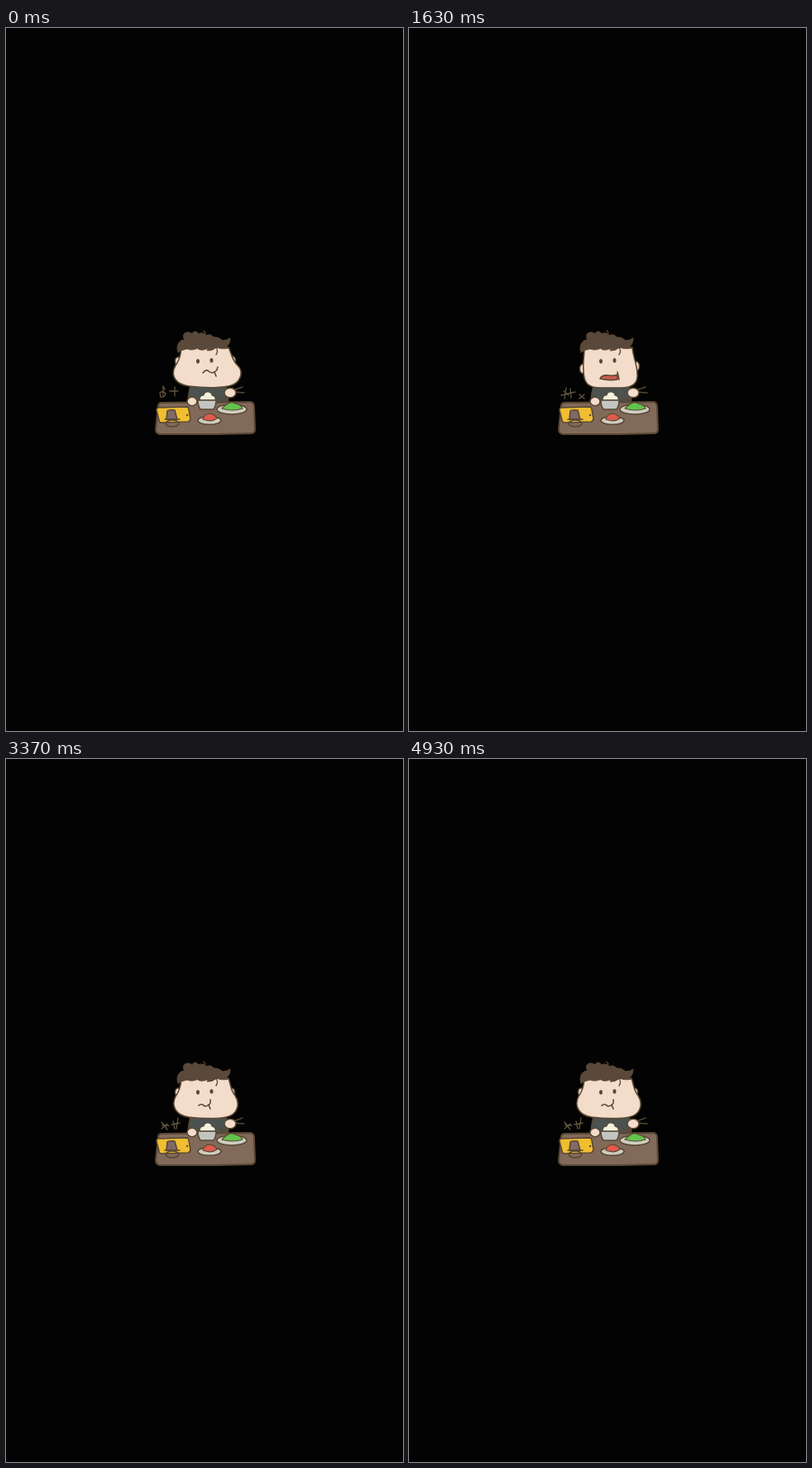
An HTML page that plays this animation: 480x848 px, repeating every 4960 ms.

```html
<!DOCTYPE html>
<html lang="en">
<head>
<meta charset="utf-8">
<title>Dinner</title>
<style>
html, body { margin: 0; width: 100%; height: 100%; overflow: hidden; background: #030303; }
svg { display: block; width: 100%; height: 100%; }
.ink { fill: none; stroke: #594833; stroke-width: 1.6; stroke-linecap: round; stroke-linejoin: round; }
.skin { fill: #f4dccb; }
.dot { fill: #594833; stroke: none; }
.spark { stroke: #62563f; stroke-width: 1.3; }
</style>
</head>
<body>
<svg viewBox="0 0 480 848">
<g class="ink">
  <!-- body -->
  <path fill="#4b5250" d="M223 432 Q220 442 220 455 H268 Q270 442 266 432Z"/>

  <!-- heads, each shown in its own step -->
  <g class="skin" data-step="0">
    <ellipse cx="208" cy="402" rx="3.5" ry="5"/><ellipse cx="274" cy="401" rx="3.5" ry="5"/>
    <path d="M212 386 C211 397 209 402 205 407 C198 419 205 430 221 432 C238 434 258 434 269 432 C284 429 288 415 280 407 C274 402 273 394 269 385Z"/>
  </g>
  <g class="skin" data-step="2">
    <ellipse cx="208" cy="402" rx="3.5" ry="5"/><ellipse cx="273" cy="402" rx="3.5" ry="5"/>
    <path d="M212 386 C211 397 209 402 205 407 C199 419 206 430 221 432 C238 434 256 434 266 432 C281 429 283 415 277 406 C272 401 272 394 269 385Z"/>
  </g>
  <g class="skin" data-step="1">
    <ellipse cx="210" cy="411" rx="3.5" ry="5.5"/><ellipse cx="275" cy="408" rx="3.5" ry="5.5"/>
    <path d="M212 386 C212 396 210 403 211 413 C211 429 217 434 232 434 H256 C271 434 277 428 276 417 C276 406 271 398 270 385Z"/>
  </g>
  <g class="skin" data-step="3">
    <ellipse cx="209" cy="411" rx="3.5" ry="5.5"/><ellipse cx="275" cy="408" rx="3.5" ry="5.5"/>
    <path d="M212 386 C212 396 209 403 210 414 C210 430 219 437 232 437 H254 C271 436 277 429 276 417 C276 406 271 398 270 385Z"/>
  </g>

  <!-- hair -->
  <path fill="#5a493b" stroke-width="1" d="M208 391 C205 384 209 376 216 376 C211 369 219 364 225 369 Q228 363 233 369 Q238 366 242 371 Q247 368 251 373 Q257 372 262 377 Q267 377 271 374 Q271 382 266 384 L270 386 Q260 388 255 385 Q249 390 243 389 L245 386 Q237 390 232 387 L234 385 Q226 390 219 387 Q213 388 208 391Z"/>
  <path d="M240 371 Q242 367 239 365 M254 385 Q257 390 254 394" stroke-width="1.4"/>

  <!-- eyes -->
  <g class="dot"><ellipse cx="232" cy="402" rx="2" ry="2.8"/><ellipse cx="248.5" cy="401" rx="2" ry="2.8"/></g>

  <!-- mouths -->
  <path data-step="0" d="M238 416 Q242 411 245 414 Q248 417 252 415 Q255 414 256 409 M252 415 L254 420"/>
  <path data-step="2" d="M233 418 Q237 415 239 418 Q242 420 245 417 Q248 416 247 411 M245 417 L247 422"/>
  <g data-step="1">
    <path fill="#cb5a4d" d="M231 423 Q233 418 241 419 Q248 420 252 418 V424 Q242 426 231 423Z"/>
    <path d="M252 415 L254 424"/>
  </g>
  <g data-step="3">
    <path fill="#5c2c20" d="M226 427 Q226 417 236 415 Q243 417 247 421 L246 430 Q235 433 226 427Z"/>
    <path fill="#d95a50" stroke="none" d="M228 427 Q236 422 245 426 V429 Q235 431 228 427Z"/>
    <path d="M245 421 L248 419"/>
  </g>

  <!-- table -->
  <path fill="#826a5b" stroke-width="2" d="M187 452 L296 451 Q300 452 300 457 L301 484 Q301 489 296 489 L252 490 L186 490 Q181 489 181 484 L184 456 Q184 453 187 452Z"/>

  <!-- phone on its stand -->
  <path fill="#f0be30" d="M184 458 L218 457 Q221 457 221 460 L223 471 Q223 474 220 475 L188 476 Q185 476 185 473 L182 461 Q182 458 184 458Z"/>
  <path fill="#81696a" d="M194 472 L195 462 Q196 460 204 461 L207 472Z"/>
  <ellipse cx="201" cy="477" rx="8" ry="4"/>
  <path d="M192 472 H210"/>
  <circle class="dot" cx="219" cy="467" r="1.2"/>

  <!-- dishes -->
  <ellipse fill="#cfcdbf" cx="273" cy="460" rx="18" ry="6"/>
  <path fill="#62c34c" stroke-width="1.2" d="M261 459 Q264 456 267 454 Q272 450 277 453 Q284 454 286 459 Q274 463 261 459Z"/>
  <ellipse fill="#cfcdbf" cx="246" cy="473.5" rx="14" ry="4.8"/>
  <path fill="#e05a4e" stroke-width="1.2" d="M238 472 Q239 466 246 465 Q253 466 255 471 Q248 476 238 472Z"/>
  <path d="M257 445 L268 450 M258 450 L267 446" stroke-width="1.2"/>
  <path fill="#f3f1df" stroke-width="1.2" d="M234 449 Q234 443 239 443 Q240 438 245 439 Q249 440 249 443 Q254 444 253 449Z"/>
  <path fill="#c3c5c1" d="M232 449 H254 Q254 456 251 460 H235 Q232 456 232 449Z"/>

  <!-- hands and chopsticks -->
  <path d="M275 437 L286 433 M275 439 L288 440" stroke-width="1.4"/>
  <ellipse class="skin" cx="225" cy="450.5" rx="6" ry="5.2"/>
  <ellipse class="skin" cx="271" cy="440" rx="7" ry="5.8"/>

  <!-- sparkles beside the phone -->
  <g class="spark">
    <path data-step="0" d="M190 432 V443 M190 432 L192 436 M186 440 Q190 437 193 441 Q192 446 187 445Z M198 438 H208 M204 433 V444"/>
    <path data-step="1" d="M184 443 L201 439 M190 434 L188 447 M195 435 L196 446 M187 438 L193 443 M206 442 L212 447 M212 442 L206 447"/>
    <path data-step="2" d="M188 438 L195 447 M195 440 L188 446 M189 442 H197 M202 437 L204 446 M208 433 L206 446 M200 441 L210 439"/>
    <path data-step="3" d="M183 443 L196 437 M188 433 L190 447 M193 435 L186 447 M191 439 L196 442 M203 441 L209 441 M206 437 V445"/>
  </g>
</g>
</svg>
<script>
const LOOP = 4960, STEP = 190, STEPS = 4;
const poses = document.querySelectorAll('[data-step]');

function draw(now) {
  // chew, open, chew on the other side, open wide; the loop starts halfway through the first chew
  const step = Math.floor((now % LOOP + STEP / 2) / STEP) % STEPS;
  for (const p of poses) p.style.display = +p.dataset.step === step ? '' : 'none';
}

const start = performance.now();
function tick() {
  draw(performance.now() - start);
  requestAnimationFrame(tick);
}
tick();
</script>
</body>
</html>
```
